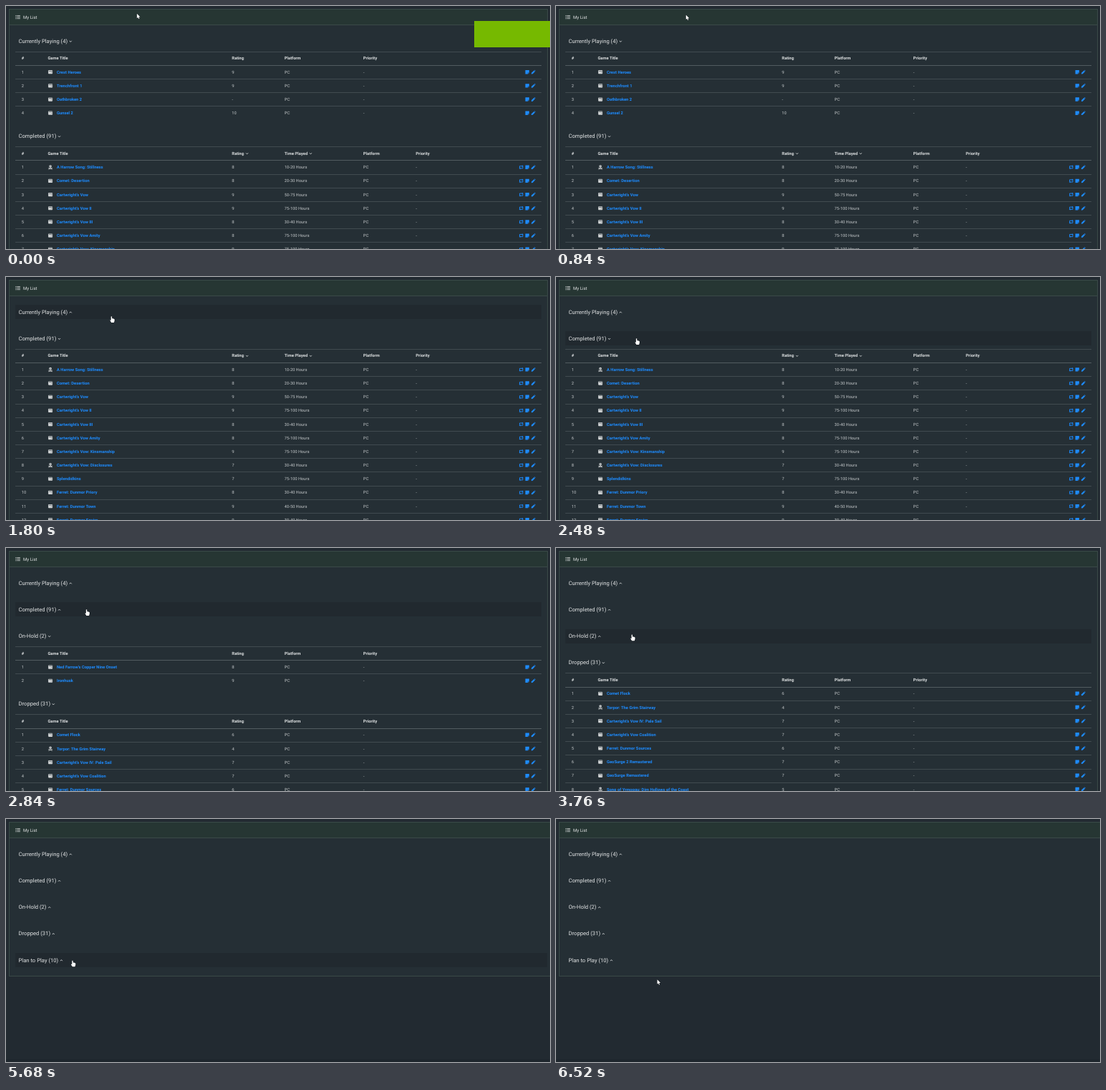
Recreate the animation shown at these times as an HTML page with a canvas. Size 761 px wide and 341 px high, loop 7.84 s.

```html
<!DOCTYPE html>
<html lang="en">
<head>
<meta charset="utf-8">
<title>My List</title>
<style>
html, body { margin: 0; width: 100%; height: 100%; overflow: hidden; background: #222a31; }
canvas { display: block; }
</style>
</head>
<body>
<canvas id="stage" width="761" height="341"></canvas>
<script>
const W = 761, H = 341, LOOP = 7840, STEP = 40;
const ROW = 19.17, GAP = 37.2, TOP = 49.1;
const ctx = document.getElementById('stage').getContext('2d');

const C = {
  page: '#222a31', foot: '#1e262d', panel: '#252f35', head: '#263633',
  edge: '#3a4a48', line: '#414b50', strong: '#525c60', hover: '#21292f',
  title: '#e2e4e5', label: '#dcdfe0', text: '#c3c7c9', link: '#1e8cff',
  icon: '#d0d3d4', green: '#76b900'
};

const owned = (name, rating, hours) => ({ name, rating, hours, icon: wallet });
const skulled = (name, rating, hours) => ({ name, rating, hours, icon: skull });
const planned = (name, priority) => ({ name, rating: '-', priority });

// Each section folds up at its "close" time.
const sections = [
  { title: 'Currently Playing', count: 4, close: 1800, rows: [
    owned('Crest Heroes', 9), owned('Trenchfront 1', 9),
    owned('Oathbroken 2', '-'), owned('Gunsel 2', 10)
  ] },
  { title: 'Completed', count: 91, close: 2840, timed: true, sorted: ['Rating', 'Time Played'], rows: [
    skulled('A Harrow Song: Stillness', 8, '10-20'),
    owned('Comet: Desertion', 8, '20-30'),
    owned("Cartwright's Vow", 9, '50-75'),
    owned("Cartwright's Vow II", 9, '75-100'),
    owned("Cartwright's Vow III", 8, '30-40'),
    owned("Cartwright's Vow Amity", 8, '75-100'),
    owned("Cartwright's Vow: Kinsmanship", 9, '75-100'),
    skulled("Cartwright's Vow: Disclosures", 7, '30-40'),
    owned('Splendidkins', 7, '75-100'),
    owned('Ferret: Dunmor Priory', 8, '30-40'),
    owned('Ferret: Dunmor Town', 9, '40-50'),
    owned('Ferret: Dunmor Squire', 9, '30-40')
  ] },
  { title: 'On-Hold', count: 2, close: 3760, rows: [
    owned("Ned Farrow's Copper Nine Onset", 8), owned('Ironhusk', 9)
  ] },
  { title: 'Dropped', count: 31, close: 4760, rows: [
    owned('Comet Flock', 6),
    skulled('Torpor: The Grim Stairway', 4),
    owned("Cartwright's Vow IV: Pale Sail", 7),
    owned("Cartwright's Vow Coalition", 7),
    owned('Ferret: Dunmor Sources', 6),
    owned('GeoSurge 2 Remastered', 7),
    owned('GeoSurge Remastered', 7),
    skulled('Song of Yrmoggu: Dim Hollows of the Coast', 5)
  ] },
  { title: 'Plan to Play', count: 10, close: 5680, sorted: ['Priority'], rows: [
    planned('Marchwolds 3', 'High'), planned('Chromeward 2091', 'High'),
    planned('Fading Lamp 2', 'Medium'), planned('Gunsel 3', 'High'),
    planned('Skyline Null Dusk: Complete Edition', 'Medium'),
    planned('Tunnel Voyage', 'Medium')
  ] }
];
const WIDE_AT = sections[4].close;

// Pointer moves: start, end, x, y.
const START = [183.2, 10.8];
const moves = [
  [800, 1400, 147.5, 56], [1560, 1600, 147.5, 55.2], [1920, 2480, 112.6, 86.2],
  [2960, 3480, 106.3, 121.4], [3960, 4480, 99.4, 160.4],
  [4960, 5480, 93, 198.5], [6000, 6520, 141.6, 225.3]
];

const clamp = v => Math.min(1, Math.max(0, v));
const ease = p => (p + p * p * (3 - 2 * p)) / 2;

function pointerAt(t) {
  let [x, y] = START;
  for (const [a, b, tx, ty] of moves) {
    const p = ease(clamp((t - a) / (b - a)));
    x += (tx - x) * p;
    y += (ty - y) * p;
  }
  return [x, y];
}

function rect(x, y, w, h, color) {
  ctx.fillStyle = color;
  ctx.fillRect(x, y, w, h);
}

function rule(y, right, color) {
  rect(13, Math.round(y), right - 13, 1, color);
}

// Draws text centred on cy and returns its right edge.
function text(str, x, cy, size, color, weight = 400) {
  ctx.font = `${weight} ${size}px Roboto, sans-serif`;
  ctx.fillStyle = color;
  ctx.fillText(str, x, cy + size * 0.355);
  return x + ctx.measureText(str).width;
}

function poly(points, fill, stroke, width) {
  ctx.beginPath();
  points.forEach(([x, y]) => ctx.lineTo(x, y));
  ctx.closePath();
  if (stroke) {
    ctx.strokeStyle = stroke;
    ctx.lineWidth = width;
    ctx.stroke();
  }
  ctx.fillStyle = fill;
  ctx.fill();
}

function line(points, color, width) {
  ctx.beginPath();
  points.forEach(([x, y]) => ctx.lineTo(x, y));
  ctx.strokeStyle = color;
  ctx.lineWidth = width;
  ctx.stroke();
}

function at(x, y, draw, ...args) {
  ctx.save();
  ctx.translate(x, y);
  draw(...args);
  ctx.restore();
}

function chevron(up, color) {
  const d = up ? -0.8 : 0.8;
  line([[-1.5, -d], [0, d], [1.5, -d]], color, 0.85);
}

function wallet() {
  ctx.fillStyle = C.icon;
  ctx.beginPath();
  ctx.roundRect(-3, -2.6, 6, 5.2, 0.8);
  ctx.fill();
  rect(-2.2, -1.7, 5.2, 0.5, C.panel);
  rect(1.4, 0.2, 0.8, 0.8, C.panel);
}

function skull() {
  ctx.fillStyle = C.icon;
  ctx.beginPath();
  ctx.ellipse(0, -1.5, 1.9, 1.6, 0, 0, 7);
  ctx.fill();
  rect(-1, -0.4, 2, 1, C.icon);
  rect(-1.1, -1.7, 0.7, 0.7, C.panel);
  rect(0.4, -1.7, 0.7, 0.7, C.panel);
  line([[-2.7, 1], [2.7, 2.8]], C.icon, 0.9);
  line([[2.7, 1], [-2.7, 2.8]], C.icon, 0.9);
}

function note() {
  poly([[-2.7, -2.7], [2.7, -2.7], [2.7, 0.9], [0.9, 2.7], [-2.7, 2.7]], C.link);
  line([[0.8, 2.6], [0.8, 0.8], [2.6, 0.8]], C.panel, 0.35);
}

function pencil() {
  poly([[-2.9, 2.9], [-2.6, 1], [0.8, -2.2], [2.2, -0.8], [-1, 2.6]], C.link);
  poly([[1.2, -2.6], [1.8, -3], [3, -1.8], [2.6, -1.2]], C.link);
}

function replay() {
  for (const s of [1, -1]) {
    line([[-2.2 * s, 1 * s], [-2.2 * s, -1.6 * s], [1.6 * s, -1.6 * s]], C.link, 0.9);
    poly([[1.2 * s, -2.9 * s], [3.1 * s, -1.6 * s], [1.2 * s, -0.3 * s]], C.link);
  }
}

function listIcon() {
  for (const y of [-2.1, 0, 2.1]) {
    rect(-3.2, y - 0.5, 1.1, 1, C.title);
    rect(-1.3, y - 0.4, 4.6, 0.8, C.title);
  }
}

function arrow() {
  poly([[0, 0], [0, 6.5], [1.5, 5.2], [2.5, 7.4], [3.5, 7], [2.6, 4.8], [4.6, 4.7]], '#fff', '#10151a', 0.8);
}

function hand() {
  poly([[-0.7, 0.4], [0, 0], [0.7, 0.4], [0.8, 3], [2.2, 3.1], [3.4, 3.5], [4.3, 4.1],
    [4.3, 6.4], [3.5, 8.8], [-0.1, 8.8], [-2, 5.9], [-1.9, 5], [-0.7, 5.6]], '#fff', '#10151a', 0.8);
}

function table(s, y, right) {
  const labels = s.timed
    ? [['Rating', 316], ['Time Played', 389.5], ['Platform', 499.8], ['Priority', 573.3]]
    : [['Rating', 316], ['Platform', 389.5], ['Priority', 499.8]];
  rule(y + 14.6, right, C.line);
  for (const [label, x] of [['#', 21.8], ['Game Title', 58.4], ...labels]) {
    const end = text(label, x, y + 24.1, 5.82, C.label, 700);
    if (s.sorted && s.sorted.includes(label)) at(end + 4.3, y + 24.4, chevron, false, C.label);
  }
  s.rows.forEach((row, i) => {
    const cy = y + 43.6 + ROW * i;
    rule(y + 33.8 + ROW * i, right, i ? C.line : C.strong);
    const cell = (str, x) => text(String(str), x, cy, 5.82, C.text);
    cell(i + 1, 21.8);
    if (row.icon) at(62.1, cy, row.icon);
    text(row.name, row.icon ? 71 : 62.3, cy, 5.82, C.link, 700);
    cell(row.rating, 316);
    if (s.timed) cell(row.hours + ' Hours', 389.5);
    cell('PC', s.timed ? 499.8 : 389.5);
    cell(row.priority || '-', s.timed ? 573.3 : 499.8);
    if (s.timed) at(720.7, cy, replay);
    at(729.2, cy, note);
    at(737.8, cy, pencil);
  });
}

function panel(wide) {
  const right = wide ? 766 : 758, bottom = wide ? 221 : 360;
  rect(0, 0, W, H, C.page);
  if (wide) rect(0, 337, W, 4, C.foot);
  rect(4, 4, right - 4, bottom - 4, C.edge);
  rect(5, 5, right - 6, bottom - 6, C.panel);
  rect(5, 5, right - 6, 21, C.head);
  rect(5, 26, right - 6, 1, C.edge);
  at(16.6, 15.6, listIcon);
  text('My List', 24, 15.6, 6.1, C.title);
}

function draw(t) {
  const wide = t >= WIDE_AT;
  const right = wide ? 757 : 749;
  const [px, py] = pointerAt(t);
  let y = TOP, over = false;

  panel(wide);
  for (const s of sections) {
    const closed = t >= s.close;
    if (Math.abs(py - y) < 10) {
      over = true;
      rect(13, Math.round(y - 10), right - 13, 20, C.hover);
    }
    const end = text(`${s.title} (${s.count})`, 17.5, y, 7.65, C.title);
    at(end + 4.2, y + 0.5, chevron, closed, C.title);
    if (!closed) table(s, y, right);
    y += GAP + (closed ? 0 : ROW * (s.count + 1) + 0.5);
    if (y > H + 20) break;
  }

  if (t < 120) rect(655 + 106 * t / 120, 21, 106, 37, C.green);
  at(px, py, over ? hand : arrow);
}

ctx.textRendering = 'geometricPrecision';
ctx.lineJoin = 'round';
const begin = performance.now();
function tick() {
  const t = (performance.now() - begin) % LOOP;
  draw(Math.floor(t / STEP) * STEP);
  requestAnimationFrame(tick);
}
tick();
</script>
</body>
</html>
```
